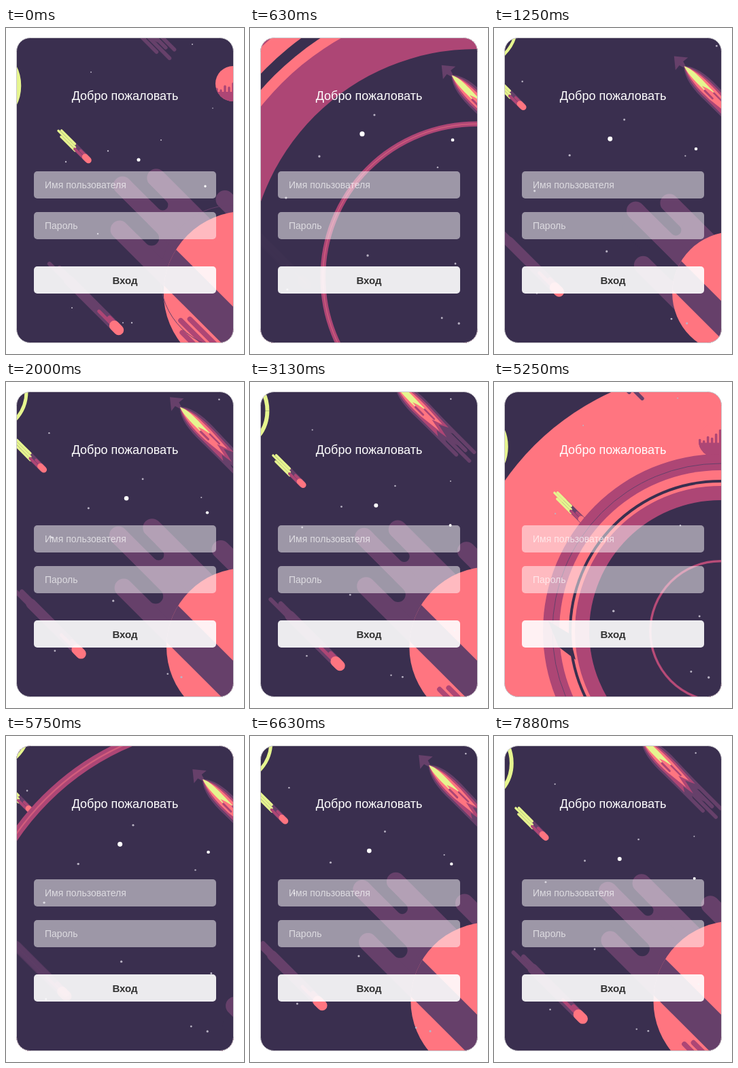
An HTML page with a canvas that plays this animation: 350x480 px, repeating every 8000 ms.

```html
<!DOCTYPE html>
<html lang="ru">
<head>
<meta charset="utf-8">
<style>
html, body { margin: 0; width: 100%; height: 100%; overflow: hidden; background: #fff; }
body { position: relative; font: 14px "Liberation Sans", Arial, sans-serif; }
canvas { position: absolute; left: 0; top: 0; }
h1, .field, .button { position: absolute; margin: 0; box-sizing: border-box; white-space: nowrap; }
h1 { left: 15px; width: 320px; top: 90px; font-size: 18px; font-weight: 400; line-height: 20px; text-align: center; color: #fff; }
.field, .button { left: 41px; width: 268px; height: 40px; line-height: 40px; border-radius: 5px; }
.field { padding-left: 16px; background: rgba(255,255,255,.5); color: rgba(255,255,255,.66); }
.button { top: 351px; background: rgba(255,255,255,.9); color: #333; font-size: 15px; font-weight: 700; line-height: 42px; text-align: center; }
</style>
</head>
<body>
<canvas width="350" height="480"></canvas>
<h1>Добро пожаловать</h1>
<div class="field" style="top:211px">Имя пользователя</div>
<div class="field" style="top:271px">Пароль</div>
<div class="button">Вход</div>
<script>
const ctx = document.querySelector('canvas').getContext('2d');
const DARK = '#3a2f4f', PINK = '#ff7580', MAGENTA = '#ad4675', PURPLE = '#66406a', GREEN = '#e6f58f';
const LOOP = 8000, STEP = 125, CYCLE = 4.84;
const WAVE = [333, 367];

// start x, y, end x, y, radius
const STARS = [
  [165, 156, 195, 194, 3], [183, 128, 228, 165, 1.3], [102, 189, 150, 181, 1.4],
  [298, 165, 293, 233, 2], [173, 335, 135, 303, 1.4], [302, 347, 300, 375, 1.2],
  [282, 427, 172, 434, 1.2], [307, 435, 185, 434, 1.4], [53, 250, 88, 197, 1.4],
  [22, 82, 125, 65, 1.1], [55, 385, 97, 412, 1.3], [340, 27, 274, 24, 1.2],
  [276, 205, 304, 118, 1]
];

// radius when the wave is 0.29 s old, growth exponent, colour; outermost first
const BANDS = [
  [261, 1.21, MAGENTA], [237, 1.21, PINK], [223, 1.21, DARK], [219, 1.175, PINK], [214, 1.148, MAGENTA]
];

const clamp = v => Math.max(0, Math.min(1, v));

function path(x, y, r) {
  ctx.beginPath();
  ctx.arc(x, y, Math.max(0, r), 0, 7);
}

function disc(x, y, r, color) {
  path(x, y, r);
  ctx.fillStyle = color;
  ctx.fill();
}

function ring(x, y, r, width, color) {
  path(x, y, r);
  ctx.lineWidth = width;
  ctx.strokeStyle = color;
  ctx.stroke();
}

function bar(x0, x1, y, width, color) {
  ctx.beginPath();
  ctx.moveTo(x0, y);
  ctx.lineTo(x1, y);
  ctx.lineCap = 'round';
  ctx.lineWidth = width;
  ctx.strokeStyle = color;
  ctx.stroke();
}

function shape(color, d) {
  ctx.fillStyle = color;
  ctx.fill(new Path2D(d));
}

// Draws in turned coordinates; by default the x axis points down-right.
function turned(x, y, draw, angle = Math.PI / 4) {
  ctx.save();
  ctx.translate(x, y);
  ctx.rotate(angle);
  draw();
  ctx.restore();
}

function bigPlanet(t) {
  const grow = 1 - (1 - clamp((t - .85) / .75)) ** 2;
  if (!grow) return;
  const r = (116 + 1.5 * (t - 2)) * grow;
  turned(352, 390, () => {
    const slide = (1 - grow) * 290, up = slide + 3 * (t - 2), low = slide - 3 * (t - 2);
    ctx.fillStyle = PURPLE;
    ctx.fillRect(up - 200, -27, 300, 44);
    ctx.fillRect(low - 165, 16, 270, 50);
    for (const [u, v] of [[up - 248, 16], [up - 221, -27], [low - 188, 65], [up - 127, -76]]) bar(u, 120, v, 27, PURPLE);
    bar(up - 240, up - 186, -5.5, 16, DARK);
    bar(low - 240, low - 146, 40.5, 22, DARK);

    disc(0, 0, r, PINK);
    ctx.save();
    path(0, 0, r);
    ctx.clip();
    ctx.fillStyle = PURPLE;
    ctx.fillRect(-150, 27 * grow, 300, 50 * grow);
    const u = 2 - 18 * (t - 3.04);
    if (t > 2.6) [0, -8, 6].forEach((d, i) => bar(u + d, 150, 85 + i * 11, 7.5, MAGENTA));
    ctx.restore();
  });
  if (t > 4.7) ring(...WAVE, 106, 1, PURPLE);
}

function lowerComet(t) {
  ctx.globalAlpha = clamp((t - .6) / .6);
  turned(85 + 19.5 * (t - .63), 380 + 15.7 * (t - .63), () => {
    bar(-143, -8, 3, 6, PURPLE);
    bar(-128, -4, -3, 7, PURPLE);
    bar(-106, -4, 0, 15, PURPLE);
    bar(-42, -4, 1, 5, MAGENTA);
    bar(-24, -4, -3, 7, MAGENTA);
    bar(-11, -2, 0, 15, PINK);
  });
  ctx.globalAlpha = 1;
}

function upperComet(t) {
  const u = t - 2, x = 57 + 18 * u + 1.8 * u * u;
  turned(x, x + 73.5, () => {
    bar(-42, -4, 0, 10, PURPLE);
    [[-61, -3], [-64, .5], [-55, 4]].forEach(([end, v]) => bar(end, -30 + v, v, 3.4, GREEN));
    bar(-28, -4, 2.5, 4, MAGENTA);
    bar(-20, -4, -2, 4, MAGENTA);
    bar(-9, -2, 0, 9, PINK);
  });
}

function rocket(t) {
  const u = t - .63, x = 283 - 25 * u - 3.4 * u * u;
  turned(x, x - 227 + 6 * u, () => {
    [[174, -10], [163, -3], [178, 4], [158, 11]].forEach(([end, v]) => bar(60, end, v, 5.5, PURPLE));
    shape(PURPLE, 'M-2 0L14 -13L13 -4L26 0L13 4L14 13Z');
    shape(PURPLE, 'M18 0C32 -13 55 -15 78 -14L140 -12L128 -5L150 0L130 6L142 13L78 14C52 15 32 12 18 0Z');
    shape(MAGENTA, 'M19 0C36 -11 58 -11 80 -11L122 -9L108 -2L130 3L112 6L120 11L78 11C52 12 32 9 19 0Z');
    shape(PINK, 'M20 0C38 -9 58 -8 76 -8L112 -6L96 0L116 4L80 8C54 9 36 7 20 0Z');
    shape(GREEN, 'M19 0C30 -6 44 -5 80 -4L66 -1L58 2L74 4C50 4 32 5 19 0Z');
    bar(66, 82, 4, 3, MAGENTA);
    bar(78, 98, -3, 2.5, MAGENTA);
  });
}

function smallPlanet(t) {
  const age = t - CYCLE, x = 334 - 18 * age, y = 82 + 9 * age;
  ctx.save();
  disc(x, y, 26, PINK);
  path(x, y, 26);
  ctx.clip();
  turned(x, y, () => {
    for (let i = -4; i < 5; i++) bar(i % 2 * 4 + i * 2 - 20 * age, 40, i * 6, 3.6, MAGENTA);
  }, Math.PI / 2);
  ctx.fillStyle = MAGENTA;
  ctx.fillRect(x - 26, y + 12 - 20 * age, 52, 40);
  ctx.restore();
}

function greenPlanet(t) {
  const width = 5 + .8 * (t - 2);
  ring(-31 - 3.6 * (t - 2), 14 + 25 * (t - 2), 63.5 - width / 2, width, GREEN);
}

function stars(t) {
  const u = (t - .63) / 4.21, s = u * (1.35 - .35 * u);
  for (const [x0, y0, x1, y1, r] of STARS) {
    disc(x0 + (x1 - x0) * s, y0 + (y1 - y0) * s, r * (1.2 - .35 * u), r > 1.7 ? '#fff' : '#b9b3c4');
  }
}

function scene(t, waveRadius) {
  ctx.fillStyle = DARK;
  ctx.fillRect(0, 0, 350, 480);
  bigPlanet(t);
  lowerComet(t);
  if (waveRadius) disc(...WAVE, waveRadius, PINK);
  stars(t);
  greenPlanet(t);
  smallPlanet(t);
  upperComet(t);
  rocket(t);
}

function transition(t) {
  scene(t + CYCLE, t && 100 + 700 * t);
  const s = (t - .12) / .29;
  if (s <= 0) return;
  for (const [radius, power, color] of BANDS) disc(...WAVE, radius * s ** power, color);
  ring(...WAVE, 247 * s ** 1.21, 1, PURPLE);
  if (t > .3 && t < .5) shape(DARK, 'M80 352L110 370L120 409L95 390Z');

  ctx.save();
  path(...WAVE, 193 * s);
  ctx.clip();
  scene(t);
  ctx.restore();

  const r = 570 * (t - .229);
  if (r > 0) {
    ring(...WAVE, r, .034 * r, MAGENTA);
    ring(...WAVE, r, .006 * r, '#d25d7c');
  }
}

function draw(ms) {
  const t = Math.floor(ms % LOOP / STEP) * STEP / 1000 % CYCLE;
  ctx.clearRect(0, 0, 350, 480);
  const card = new Path2D();
  card.roundRect(15.5, 14.5, 319, 449, 20);
  ctx.save();
  ctx.clip(card);
  if (t < 1.15) transition(t);
  else scene(t);
  ctx.restore();
  ctx.lineWidth = 1;
  ctx.strokeStyle = '#c9c7cc';
  ctx.stroke(card);
}

const start = performance.now();
function tick() {
  draw(performance.now() - start);
  requestAnimationFrame(tick);
}
tick();
</script>
</body>
</html>
```
